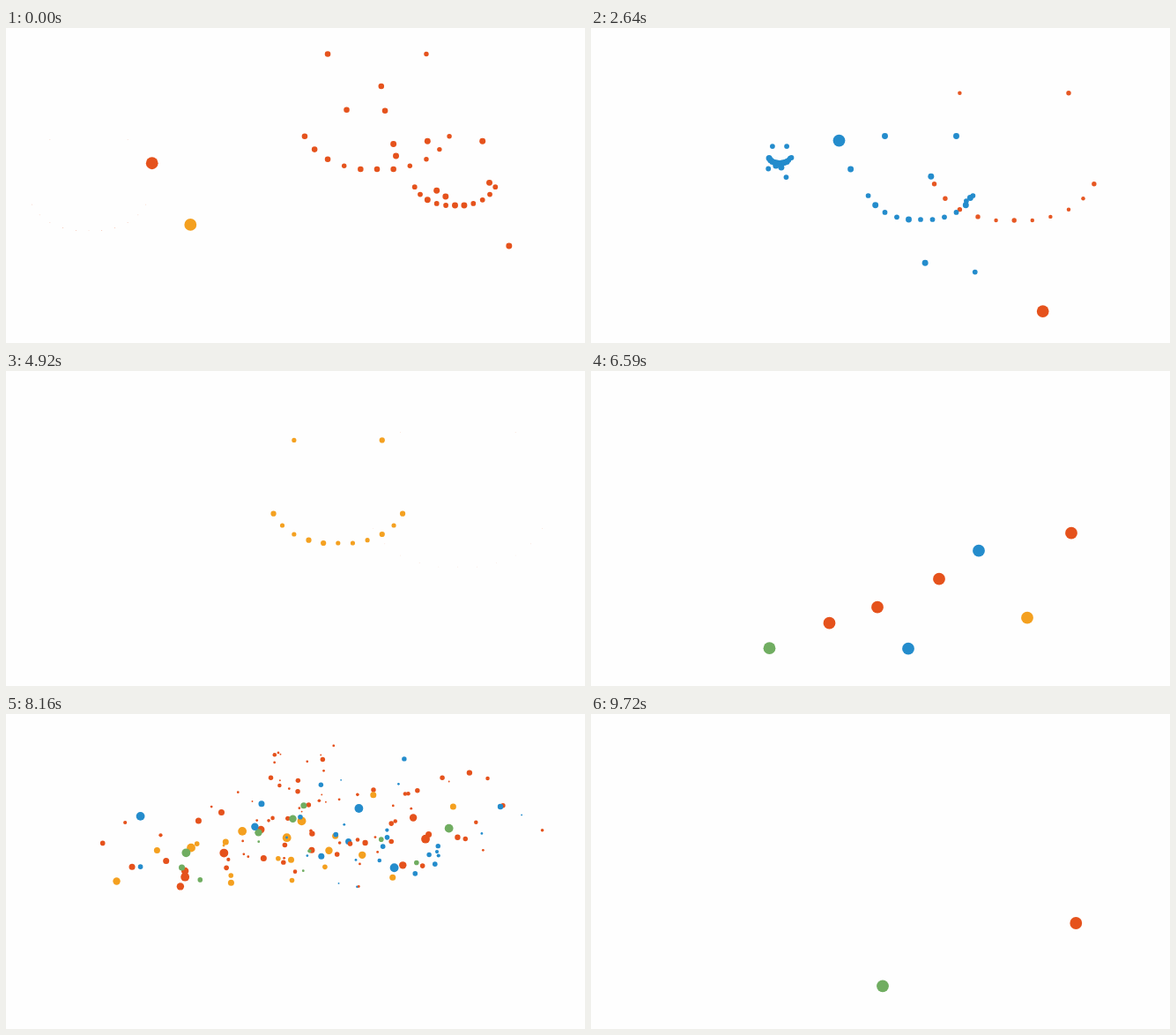
An HTML page with a canvas that plays this animation: 657 px wide and 357 px high, repeating every 9820 ms.

```html
<!DOCTYPE html>
<html lang="en">
<head>
<meta charset="utf-8">
<title>Firework dots</title>
<style>
html, body { margin: 0; width: 100%; height: 100%; overflow: hidden; background: #fefefe; }
canvas { display: block; }
</style>
</head>
<body>
<canvas id="stage" width="657" height="357"></canvas>
<script>
const ctx = document.getElementById('stage').getContext('2d');
const LOOP = 9820, TOP = 26, FLOOR = 322, GRAVITY = 55, RISE = 140, FAST_RISE = 240;
const COLORS = { r: '#e5521c', o: '#f4a01f', b: '#248ccc', g: '#70ad61' };

function seeded(seed) {
  return () => {
    seed = seed + 0x6d2b79f5 | 0;
    let n = Math.imul(seed ^ seed >>> 15, 1 | seed);
    n ^= n + Math.imul(n ^ n >>> 7, 61 | n);
    return ((n ^ n >>> 14) >>> 0) / 4294967296;
  };
}
const random = seeded(7);
const between = (a, b) => a + (b - a) * random();
const pick = list => list[Math.floor(random() * list.length)];
const dotSize = () => .7 * Math.floor(between(2, 8));
const spread = age => 1 - Math.exp(-1.5 * age);
const fall = age => GRAVITY * age * age;

function dot(x, y, r, c, alpha = 1) {
  if (r <= 0) return;
  ctx.globalAlpha = alpha;
  ctx.fillStyle = COLORS[c];
  ctx.beginPath();
  ctx.arc(x, y, r, 0, 7);
  ctx.fill();
}

function rocket(x, y, c) {
  if (y < FLOOR) dot(x, y, 6.9, c);
}

// Smile in units around the burst point: eyes, then the mouth outwards
const half = [[3, -5], [1, 2], [2, 1.8], [3, 1.4], [3.8, .8], [4.4, 0]];
const smile = [[0, 2], ...half, ...half.map(([x, y]) => [-x, y])];

// x, colour, burst time, then at a later time: unit size and mouth bottom; life, sparks, rise
const faces = [
  [94, 'r', -1.16, 0, 14.7, 229.5, 1.2, 0],
  [421, 'r', -.7, 0, 18.65, 160, 1.4, 3],
  [509.5, 'r', -.4, 0, 10.4, 201, 1.4, 6],
  [165.7, 'r', .102, 1.26, 14.9, 242.5, 1.23, 0],
  [209.3, 'o', .647, 1.26, 11.5, 176, 1.3, 6],
  [490.5, 'g', 1.09, 1.26, 4.35, 107, 1.25, 6, FAST_RISE],
  [480.2, 'r', 1.535, 2.64, 20.6, 218, 1.6, 0],
  [374, 'b', 2.23, 2.64, 13.5, 217, 1.3, 6],
  [214, 'b', 2.54, 2.64, 2.7, 153, 1.3, 5, FAST_RISE],
  [281.5, 'b', 2.78, 3.6, 16, 177, 1.3, 3],
  [512.7, 'r', 3.995, 4.92, 21.8, 222, .945, 0],
  [376.8, 'o', 4.2, 4.92, 16.65, 195, 1.25, 0]
].map(([x, c, t0, at, unit, bottom, life, sparks, rise = RISE]) => {
  const span = at - t0;
  const points = [...smile, ...Array.from({ length: sparks }, () => [between(-7, 7), between(-6, 9)])];
  return {
    x, c, t0, life, rise,
    y: bottom - 2 * unit - fall(span),
    scale: unit / spread(span),
    points: points.map(([dx, dy]) => [dx, dy, pick([2.9, 3.5])])
  };
});

function drawFace(f, t) {
  const age = t - f.t0;
  if (age < 0) return rocket(f.x, f.y - f.rise * age, f.c);
  if (age >= f.life) return;
  const unit = f.scale * spread(age), y = f.y + fall(age);
  const size = 1 - (age / f.life) ** 4;
  const alpha = 1 - .6 * (age / f.life) ** 8;
  for (const [dx, dy, r] of f.points) dot(f.x + dx * unit, y + dy * unit, r * size, f.c, alpha);
}

// Round bursts: x, y, colour, burst time, number of dots, reach across and up
const FULL = 7.5;
const bursts = [
  [325, 92, 'r', 7.2, 27, 42, 42],
  [395, 60, 'r', 7.2, 13, 45, 32],
  [545, 68, 'r', 6.95, 13, 82, 32],
  [440, 76, 'b', 7, 12, 115, 58]
].map(([x, y, c, t0, count, w, h]) => ({
  x, y, c, t0,
  dots: Array.from({ length: count }, () => {
    const angle = between(0, 2 * Math.PI), reach = Math.sqrt(random());
    return [w * reach * Math.cos(angle), h * reach * Math.sin(angle), dotSize()];
  })
}));

function drawBurst(b, t) {
  const age = t - b.t0, span = FULL - b.t0;
  if (age < 0) return rocket(b.x, b.y - FAST_RISE * age, b.c);
  const grow = spread(age) / spread(span);
  const y = b.y + fall(age) - fall(span) * grow;
  const size = 1 - (Math.max(0, t - FULL) / .9) ** 2;
  for (const [dx, dy, r] of b.dots) dot(b.x + dx * grow, y + dy * grow, r * size, b.c);
}

// Rockets where they are at FULL; the word bursts out of them
const WORD_START = 7.65, WORD_SET = 8.7;
const rockets = [
  [270.5, 38, 'r'], [202.5, 66.5, 'g'], [103, 133.5, 'b'], [360, 67, 'b'],
  [344, 109.5, 'o'], [495, 32, 'o'], [468, 145, 'r'], [447.5, 185, 'r']
];

const strokes = [
  [[112, 144], [112, 221], [176, 223]],
  [[181, 208], [205, 200], [218, 165], [244, 131], [268, 126], [265, 150], [257, 181]],
  [[287, 160], [307, 195], [281, 200], [268, 213], [249, 223]],
  [[332, 127], [348, 159], [377, 223], [390, 207], [407, 162], [427, 141]],
  [[465, 128], [469, 176], [469, 221]],
  [[479, 129], [530, 131]], [[479, 175], [526, 175]], [[474, 219], [536, 220]]
];

// Dots lie along the strokes, less settled towards the right, with a few strays above
const word = [];
for (const path of strokes)
  for (let i = 1; i < path.length; i++) {
    const [ax, ay] = path[i - 1], [bx, by] = path[i];
    const count = Math.max(1, Math.round(Math.hypot(bx - ax, by - ay) / 10));
    for (let k = 0; k < count; k++) {
      const x = ax + (bx - ax) * k / count, y = ay + (by - ay) * k / count;
      const jitter = (x - 112) / 60;
      const stray = random() < .09 ? between(0, jitter * 14) : 0;
      word.push({
        x: x + between(-jitter, jitter), y: y + between(-jitter, jitter) - stray,
        r: dotSize(), c: pick('rrrrrbboog'), from: rockets[word.length % rockets.length]
      });
    }
  }

function drawWord(t) {
  const p = Math.min(1, (t - WORD_START) / (WORD_SET - WORD_START));
  const move = 1 - (1 - p) ** 3;
  const after = Math.max(0, t - WORD_SET);
  const size = 1 - (after / .8) ** 2;
  for (const { x, y, r, c, from: [rx, ry] } of word) {
    const sy = Math.max(34, ry - FAST_RISE * (WORD_START - FULL));
    dot(rx + (x - rx) * move, sy + (y - sy) * move + fall(after), r * size, c);
  }
}

// Time advances in short holds between these moments
const marks = [0, 1260, 2640, 4920, 7500, 8700, 9720, LOOP];
function hold(ms) {
  const i = marks.findLastIndex(m => m <= ms);
  const span = marks[i + 1] - marks[i];
  const step = span / Math.round(span / 131);
  return (marks[i] + Math.floor((ms - marks[i]) / step) * step) / 1000;
}

function draw(t) {
  ctx.globalAlpha = 1;
  ctx.fillStyle = '#fefefe';
  ctx.fillRect(0, 0, 657, 357);
  ctx.save();
  ctx.beginPath();
  ctx.rect(0, TOP, 657, 331);
  ctx.clip();
  if (t < 5.47) faces.forEach(f => drawFace(f, t));
  else if (t >= 6.3 && t < 9.5) {
    bursts.forEach(b => drawBurst(b, t));
    if (t < WORD_START) rockets.forEach(([x, y, c]) => rocket(x, y - FAST_RISE * (t - FULL), c));
    else drawWord(t);
  } else if (t > 9.55) {
    rocket(550.3, 237 - RISE * (t - 9.72), 'r');
    rocket(331, 308.3 - RISE * (t - 9.72), 'g');
  }
  ctx.restore();
}

const start = performance.now();
function frame() {
  draw(hold((performance.now() - start) % LOOP));
  requestAnimationFrame(frame);
}
frame();
</script>
</body>
</html>
```
